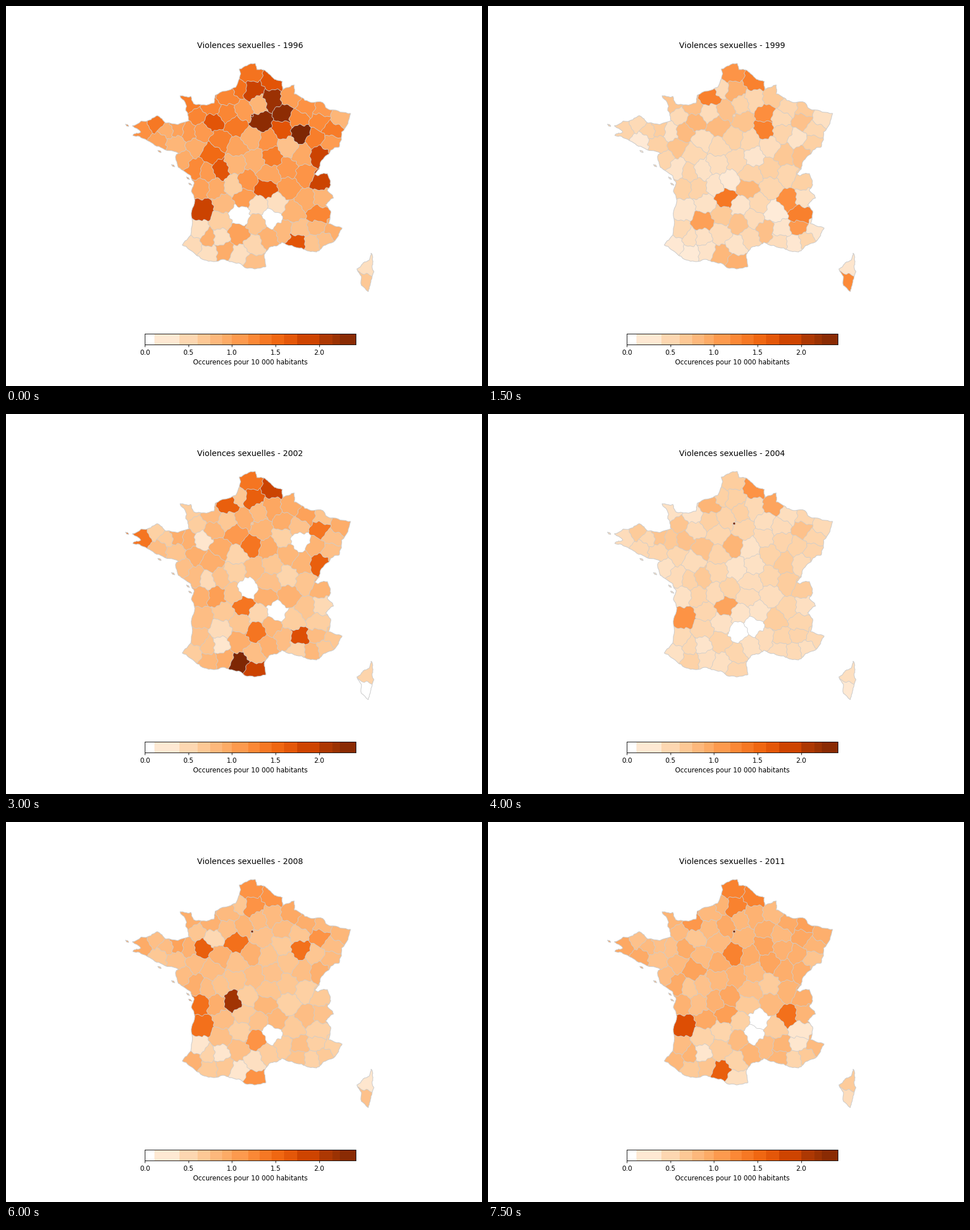
These frames come from a looping animation (837x669 px, 8 s). A matplotlib script:

```python
import numpy as np
import matplotlib.pyplot as plt
from matplotlib.animation import FuncAnimation
from matplotlib.patches import PathPatch
from matplotlib.path import Path

W, H, DPI = 837, 669, 72
FIRST, LAST, TOP = 1996, 2011, 2.42
CMAP = plt.get_cmap("Oranges")
GREY = 0.8
UNIT = 7 / 6  # one typographic point in pixels

plt.rcParams.update({
    "font.family": "DejaVu Sans", "font.size": 10 * UNIT,
    "axes.linewidth": 0.8 * UNIT, "axes.labelpad": 4 * UNIT,
    "xtick.major.size": 3.5 * UNIT, "xtick.major.pad": 3.5 * UNIT,
    "xtick.major.width": 0.8 * UNIT,
})

# Key points of the coast and border, clockwise in stage pixels.
MAINLAND = [
    (438, 101), (441, 112), (456, 114), (471, 128), (486, 133), (487, 147),
    (507, 139), (507, 155), (525, 166), (557, 170), (570, 183), (606, 189),
    (590, 222), (586, 248), (571, 254), (553, 275), (543, 296), (548, 299),
    (565, 295), (571, 315), (565, 325), (576, 338), (562, 350), (571, 361),
    (567, 383), (591, 391), (585, 404), (562, 421), (546, 433), (520, 426),
    (485, 416), (463, 425), (454, 438), (457, 459), (437, 463), (405, 453),
    (382, 446), (360, 449), (333, 437), (310, 421), (318, 412), (326, 370),
    (330, 333), (327, 322), (331, 312), (325, 299), (303, 284), (298, 265),
    (303, 259), (272, 249), (246, 235), (223, 228), (237, 222), (222, 211),
    (255, 200), (266, 193), (281, 206), (322, 202), (316, 184), (306, 158),
    (325, 159), (330, 172), (366, 171), (368, 157), (404, 143), (410, 111),
]
CORSICA = [(642, 435), (645, 455), (647, 468), (641, 488), (637, 503),
           (625, 492), (617, 463), (630, 451), (639, 447)]
ISLANDS = [(270, 256), (294, 281), (213, 210), (320, 303), (324, 314)]

# Landmark departments; the others fill the space between them.
PLACES = {
    "Nord": (471, 130), "Calais": (428, 118), "Somme": (431, 149),
    "Seine": (391, 160), "Aisne": (469, 166), "Marne": (488, 190),
    "Ardennes": (500, 161), "Brie": (450, 203), "HMarne": (519, 223),
    "Aube": (486, 217), "Meurthe": (553, 201), "Loiret": (432, 233),
    "Eure": (404, 212), "Orne": (365, 203), "Mayenne": (344, 222),
    "Finistere": (243, 218), "Doubs": (551, 264), "HSavoie": (553, 309),
    "Isere": (528, 341), "HAlpes": (549, 368), "Alpes": (547, 391),
    "Vaucluse": (516, 394), "Bouches": (513, 414), "Vienne": (377, 288),
    "HVienne": (400, 315), "Creuse": (422, 308), "Correze": (419, 339),
    "Dome": (458, 322), "Cantal": (443, 351), "HLoire": (476, 348),
    "Lozere": (467, 373), "Aveyron": (442, 383), "Lot": (411, 368),
    "Charente": (343, 320), "Gironde": (346, 359), "Garonne": (377, 379),
    "Landes": (340, 396), "Gers": (376, 407), "Ariege": (408, 439),
    "Roussillon": (437, 454), "CorseS": (627, 482), "CorseN": (636, 462),
}
COUNT = 94
PARIS = (433, 193)
NAMES = list(PLACES)

# year: usual rate, rise towards the north, spread, departments that stand out
YEARS = {
    1996: (1.0, .3, .2, {
        0: "Lozere Lot", .4: "Landes Gers HLoire Ariege CorseN Cantal",
        1.7: "Nord Orne Vienne Dome Bouches Aube",
        1.9: "Somme Doubs HSavoie Gironde", 2.2: "Aisne Paris",
        2.3: "Marne Brie", 2.42: "HMarne"}),
    1998: (.5, .15, .12, {
        0: "Creuse", 1.15: "Somme Seine Marne Aube HAlpes Roussillon",
        1.3: "Orne Ariege", 1.45: "Nord Alpes", 2.42: "Correze"}),
    2000: (.5, .1, .12, {
        0: "Cantal", 1.15: "Aube Eure", 1.3: "Marne Nord",
        1.5: "Calais Seine HAlpes", 1.75: "Garonne", 2.3: "CorseS",
        2.42: "Isere"}),
    2002: (.75, .1, .15, {
        0: "Creuse HLoire HMarne CorseS", .3: "Mayenne Gers",
        1.4: "Finistere Loiret Correze Aveyron Meurthe Calais",
        1.6: "Seine Somme Doubs", 1.75: "Vaucluse", 1.9: "Nord Roussillon",
        2.42: "Ariege"}),
    2004: (.5, .05, .1, {
        0: "Aveyron Lozere", .85: "Loiret Seine", 1.0: "Ardennes Correze",
        1.15: "Nord Gironde", 2.42: "Paris"}),
    2008: (.75, .1, .12, {
        0: "Lozere", .3: "Landes Gers Ariege CorseN",
        1.15: "Nord Calais Somme Roussillon Aveyron Meurthe",
        1.45: "Eure Charente Gironde HMarne", 1.6: "Mayenne",
        2.15: "HVienne", 2.42: "Paris"}),
    2011: (.8, .15, .12, {
        0: "HLoire Lozere", .3: "Gers HAlpes Alpes",
        1.3: "Nord Calais Somme Loiret", 1.45: "Isere", 1.6: "Ariege",
        1.75: "Gironde", 2.42: "Paris"}),
}


def roughen(pts, rng, depth=3, amount=0.08):
    """Close the ring and push segment midpoints sideways."""
    p = np.array(pts, float)
    for _ in range(depth):
        step = np.roll(p, -1, 0) - p
        side = np.column_stack([-step[:, 1], step[:, 0]])
        push = rng.normal(0, amount, (len(p), 1)).clip(-0.15, 0.15)
        p = np.stack([p, p + step / 2 + side * push], 1).reshape(-1, 2)
    return Path(np.vstack([p, p[:1]]), closed=True)


def outline():
    rng = np.random.default_rng(5)
    rings = [MAINLAND, CORSICA]
    rings += [[(x - 3, y - 2), (x + 1, y - 1), (x + 3, y + 2), (x - 1, y + 1)]
              for x, y in ISLANDS]
    return Path.make_compound_path(*[roughen(r, rng) for r in rings])


def spread_sites():
    """Keep the landmarks, add sites in the gaps and relax those evenly."""
    gx, gy = np.meshgrid(np.arange(210, 610, 3), np.arange(100, 466, 3))
    land = np.column_stack([gx.ravel(), gy.ravel()]).astype(float)
    land = land[Path(MAINLAND).contains_points(land)]
    sites = np.array(list(PLACES.values()), float)
    gap = np.linalg.norm(land[:, None] - sites, axis=2).min(1)
    while len(sites) < COUNT:
        new = land[gap.argmax()]
        sites = np.vstack([sites, new])
        gap = np.minimum(gap, np.linalg.norm(land - new, axis=1))
    for _ in range(25):
        own = np.linalg.norm(land[:, None] - sites, axis=2).argmin(1)
        for i in range(len(PLACES), COUNT):
            sites[i] = land[own == i].mean(0)
    return sites


SITES = np.vstack([spread_sites(), PARIS])
NAMES += [""] * (COUNT - len(NAMES)) + ["Paris"]


def known(year):
    usual, rise, spread, groups = YEARS[year]
    rng = np.random.default_rng(year)
    v = usual + rise * (280 - SITES[:, 1]) / 180
    v += rng.normal(0, spread, len(v))
    special = {n: r for r, names in groups.items() for n in names.split()}
    v = [special.get(n, max(x, 0.25)) for n, x in zip(NAMES, v)]
    return np.array(v)


def rates(year):
    if year in YEARS:
        return known(year)
    a = max(y for y in YEARS if y < year)
    b = min(y for y in YEARS if y > year)
    t = (year - a) / (b - a)
    noise = np.random.default_rng(year).normal(0, 0.08, len(SITES))
    return np.clip((1 - t) * known(a) + t * known(b) + noise, 0, TOP)


def shade(values):
    values = np.asarray(values)
    rgb = CMAP(values / TOP)[..., :3]
    rgb[values < 0.11] = 1
    return rgb


# Department map: nearest site on a gently warped grid, S samples per pixel.
X0, X1, Y0, Y1, S = 205, 655, 95, 510, 3


def label_grid():
    x = np.arange(X0, X1, 1 / S, dtype=np.float32) + 0.5 / S
    y = np.arange(Y0, Y1, 1 / S, dtype=np.float32) + 0.5 / S
    x, y = np.meshgrid(x, y)
    wx = x + 1.5 * np.sin(y / 4.1 + 2 * np.sin(x / 9)) \
        + 0.9 * np.sin(y / 1.7 + x / 3.1)
    wy = y + 1.5 * np.sin(x / 3.9 + 2 * np.sin(y / 8)) \
        + 0.9 * np.sin(x / 1.8 - y / 2.9)
    best = np.full(x.shape, np.inf, np.float32)
    lab = np.zeros(x.shape, np.uint8)
    for i, (sx, sy) in enumerate(SITES[:COUNT].astype(np.float32)):
        d = (wx - sx) ** 2 + (wy - sy) ** 2
        near = d < best
        best[near] = d[near]
        lab[near] = i
    lab[np.hypot(x - PARIS[0], y - PARIS[1]) < 2.2] = COUNT
    return lab


LABELS = label_grid()
BORDER = np.zeros(LABELS.shape, bool)
for axis in (0, 1):
    BORDER |= np.roll(LABELS, 1, axis) != np.roll(LABELS, -2, axis)
AREAS = np.where(BORDER, len(SITES), LABELS)


def picture(year):
    lut = np.vstack([shade(rates(year)), [[GREY] * 3]]).astype(np.float32)
    fine = lut[AREAS]
    h, w = fine.shape[:2]
    return fine.reshape(h // S, S, w // S, S, 3).mean((1, 3))


fig = plt.figure(figsize=(W / DPI, H / DPI), dpi=DPI, facecolor="white")
ax = fig.add_axes([0, 0, 1, 1])
image = ax.imshow(picture(FIRST), extent=(X0, X1, Y1, Y0),
                  interpolation="nearest", aspect="auto")
ax.set(xlim=(0, W), ylim=(H, 0))
ax.axis("off")
coast = PathPatch(outline(), fc="none", ec=str(GREY), lw=1.1)
ax.add_patch(coast)
image.set_clip_path(coast)
title = ax.text(429.4, 73.5, "", fontsize=12 * UNIT, ha="center",
                va="baseline")

# Colour scale
EDGES = [0, .11, .4, .605, .75, .89, 1, 1.19, 1.315, 1.455, 1.6, 1.75, 2,
         2.155, 2.235, TOP]
bar = fig.add_axes([244 / W, 1 - 595.5 / H, 371 / W, 18.5 / H])
for lo, hi in zip(EDGES[:-1], EDGES[1:]):
    bar.axvspan(lo, hi, color=shade([(lo + hi) / 2])[0], lw=0)
bar.set(xlim=(0, TOP), ylim=(0, 1), yticks=[], xticks=np.arange(0, 2.1, 0.5),
        xlabel="Occurences pour 10 000 habitants")
bar.xaxis.set_major_formatter("{x:.1f}")


def update(i):
    year = FIRST + i
    image.set_data(picture(year))
    title.set_text(f"Violences sexuelles - {year}")
    return image, title


anim = FuncAnimation(fig, update, frames=LAST - FIRST + 1, interval=500,
                     repeat=True, repeat_delay=0, blit=False)
plt.show()
```
